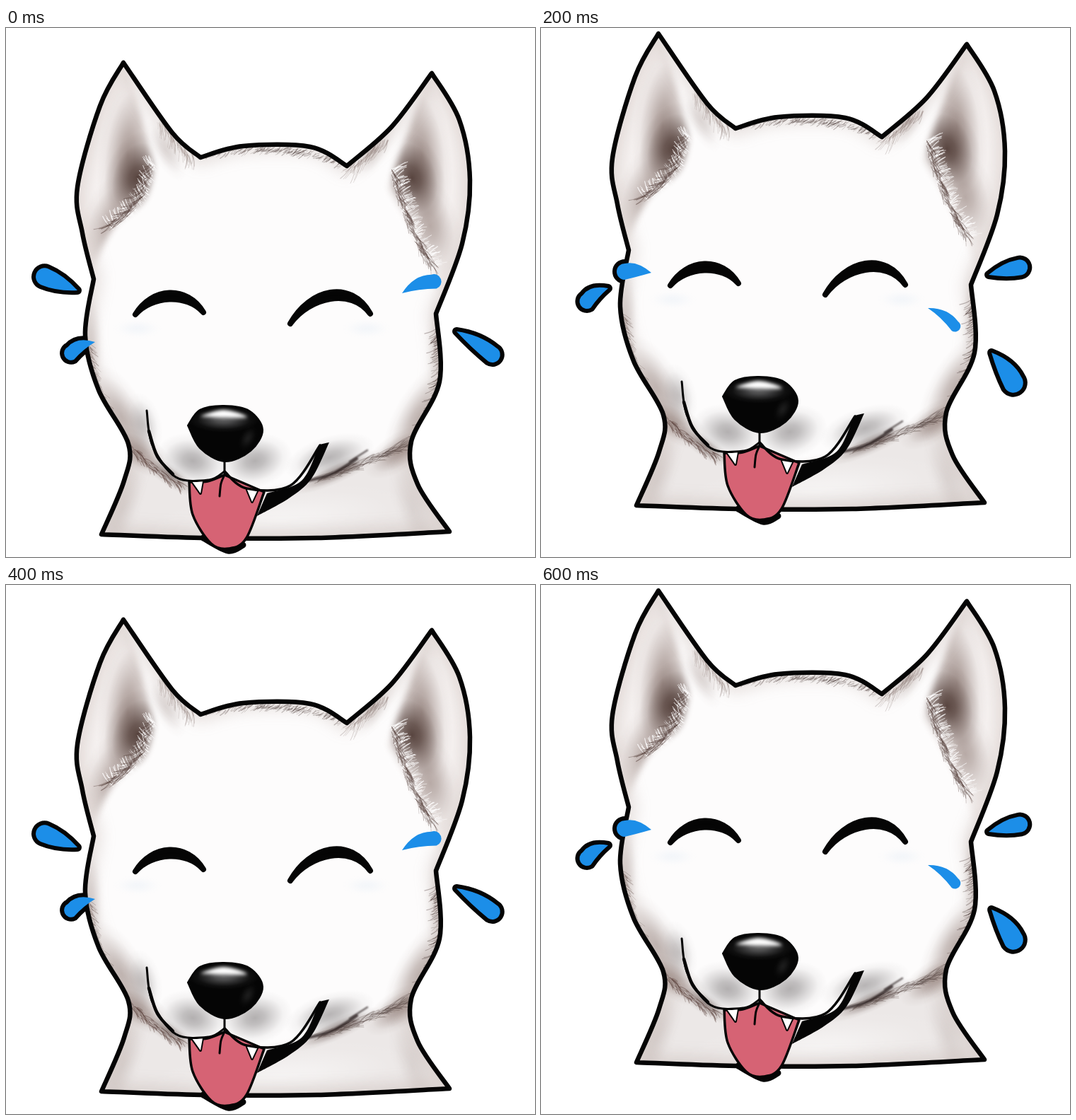
Recreate the animation shown at these times as an HTML page with a canvas. Size 748x748 px, loop 0.8 s.

```html
<!DOCTYPE html>
<html lang="en">
<head>
<meta charset="utf-8">
<title>Laughing dog</title>
<style>
html, body { margin: 0; width: 100%; height: 100%; overflow: hidden; background: #fff; }
canvas { display: block; width: 100vw; height: 100vh; }
</style>
</head>
<body>
<canvas id="stage" width="748" height="748"></canvas>
<script>
const SIZE = 748, STEP = 200, LIFT = 41;
const INK = '#050505', FACE = '#fdfcfc', BLUE = '#1c8ee8', PINK = '#d66374';
const BROWN = '98,72,64', DARK = '58,36,30', GREY = '98,93,94';
const stage = document.getElementById('stage').getContext('2d');

let seed = 7;
const rnd = () => (seed = (seed * 16807) % 2147483647) / 2147483647;
const spread = range => (rnd() - 0.5) * range;

// Smooth curve through "x,y" points; "|" marks a sharp corner.
function spline(text) {
  const path = new Path2D();
  let last = null;
  for (const part of text.split('|')) {
    const p = part.trim().split(/\s+/).map(s => s.split(',').map(Number));
    if (last) p.unshift(last); else path.moveTo(...p[0]);
    for (let i = 0; i < p.length - 1; i++) {
      const b = p[i], c = p[i + 1], a = p[i - 1] || b, d = p[i + 2] || c;
      path.bezierCurveTo(
        b[0] + (c[0] - a[0]) / 6, b[1] + (c[1] - a[1]) / 6,
        c[0] - (d[0] - b[0]) / 6, c[1] - (d[1] - b[1]) / 6, c[0], c[1]);
    }
    last = p[p.length - 1];
  }
  return path;
}

// Teardrop from its tip to its round end; bend bulges it to one side.
function drop(tipX, tipY, endX, endY, width, bend) {
  const len = Math.hypot(endX - tipX, endY - tipY), r = width / 2, mid = len * 0.42;
  const shape = new Path2D();
  shape.moveTo(0, 0);
  shape.quadraticCurveTo(mid, r * (bend - 1), len - r, -r);
  shape.arc(len - r, 0, r, -Math.PI / 2, Math.PI / 2);
  shape.quadraticCurveTo(mid, r * (bend + 1), 0, 0);
  shape.closePath();
  const path = new Path2D();
  const turn = Math.atan2(endY - tipY, endX - tipX) * 180 / Math.PI;
  path.addPath(shape, new DOMMatrix().translate(tipX, tipY).rotate(turn));
  return path;
}

// Crescent of a closed eye, arching over the chord between its corners.
function arch(x1, y1, x2, y2, rise) {
  const path = new Path2D(), inset = (x2 - x1) * 0.24;
  const high = rise * 4 / 3, low = high - 12;
  path.moveTo(x1, y1);
  path.bezierCurveTo(x1 + inset, y1 - high, x2 - inset, y2 - high, x2, y2);
  path.bezierCurveTo(x2 - inset, y2 - low, x1 + inset, y1 - low, x1, y1);
  return path;
}

const tears = [
  [
    drop(101, 371, 43, 347, 25, 0),
    drop(126, 444, 83, 464, 20, 0.8),
    drop(560, 375, 615, 355, 21, -0.8),
    drop(637, 429, 697, 468, 22, -0.3)
  ],
  [
    drop(156, 346, 107, 344, 23, 0.4),
    drop(95, 368, 56, 392, 21, 0.7),
    drop(633, 349, 688, 336, 22, -0.1),
    drop(547, 396, 592, 426, 16, -1),
    drop(637, 459, 676, 513, 28, -0.3)
  ]
];

function drawDog() {
  const cv = document.createElement('canvas');
  cv.width = cv.height = SIZE;
  const g = cv.getContext('2d');
  g.lineCap = g.lineJoin = 'round';

  const fill = (path, color, blur = 0) => {
    g.filter = `blur(${blur}px)`;
    g.fillStyle = color;
    g.fill(path);
    g.filter = 'none';
  };
  const line = (path, width, color = INK, blur = 0) => {
    g.filter = `blur(${blur}px)`;
    g.lineWidth = width;
    g.strokeStyle = color;
    g.stroke(path);
    g.filter = 'none';
  };
  const blob = (x, y, rx, ry, turn, rgb, alpha) => {
    g.save();
    g.translate(x, y);
    g.rotate(turn);
    g.scale(rx, ry);
    const grad = g.createRadialGradient(0, 0, 0, 0, 0, 1);
    [1, 0.8, 0.45, 0.12, 0].forEach((k, i) => grad.addColorStop(i / 4, `rgba(${rgb},${alpha * k})`));
    g.fillStyle = grad;
    g.fillRect(-1, -1, 2, 2);
    g.restore();
  };
  const twins = (axis, gap, y, rx, ry, turn, rgb, alpha) => {
    blob(axis - gap, y, rx, ry, turn, rgb, alpha);
    blob(axis + gap, y, rx, ry, -turn, rgb, alpha);
  };
  // Fine hairs rooted on the line from a to b, bowed sideways.
  const fur = (ax, ay, bx, by, bow, angle, len, color) => {
    const size = Math.hypot(bx - ax, by - ay);
    g.strokeStyle = color;
    for (let i = 0; i < size * 0.9; i++) {
      const t = rnd(), out = bow * 4 * t * (1 - t) + spread(8);
      const x = ax + (bx - ax) * t - (by - ay) / size * out;
      const y = ay + (by - ay) * t + (bx - ax) / size * out;
      const dir = angle + spread(0.7), l = len * (0.4 + rnd() * 0.7);
      g.lineWidth = 0.5 + rnd() * 0.8;
      g.beginPath();
      g.moveTo(x, y);
      g.quadraticCurveTo(x + Math.cos(dir) * l / 2, y + Math.sin(dir) * l / 2,
        x + Math.cos(dir + 0.25) * l, y + Math.sin(dir + 0.25) * l);
      g.stroke();
    }
  };

  const head = spline(
    '166,49 133,110 101,225 108,290 124,355 | 112,435 131,512 173,588 167,640 135,716 |' +
    '276,721 440,721 627,712 | 582,645 573,585 613,500 608,404 | 645,305 656,215 641,130 602,64 |' +
    '545,140 482,195 | 430,168 335,167 275,183 | 235,148 166,49');
  head.closePath();
  fill(head, '#f6f2f1');
  g.save();
  g.clip(head);

  // Ear hollows, then the pale face over their inner edge
  twins(380, 208, 180, 42, 120, 0.1, BROWN, 0.5);
  twins(380, 194, 212, 46, 68, 0.3, DARK, 0.8);
  twins(374, 226, 280, 42, 75, 0.25, BROWN, 0.4);
  fill(spline('166,40 | 197,140 210,195 | 196,245 150,285 112,370 | 90,480 190,600 | 300,660 435,640 | 560,590 640,480 |' +
    '612,370 575,290 540,228 | 551,190 602,55 | 375,90 166,40'), FACE, 5);
  twins(374, 148, 172, 20, 50, -0.5, BROWN, 0.2);
  fur(211, 195, 150, 285, -14, -2.5, 22, 'rgba(253,252,252,.8)');
  fur(206, 190, 145, 280, -14, 2.3, 22, 'rgba(62,38,34,.35)');
  fur(545, 200, 602, 345, 6, -0.8, 22, 'rgba(253,252,252,.8)');
  fur(546, 200, 600, 335, 6, 0.8, 20, 'rgba(62,38,34,.35)');
  fur(215, 130, 265, 186, 0, 1.1, 22, 'rgba(110,90,85,.2)');
  fur(540, 155, 490, 196, 0, 1.9, 26, 'rgba(110,90,85,.25)');

  // Neck
  fill(spline('165,585 250,648 300,668 | 435,643 580,583 | 660,740 | 110,740 | 165,585'), '#ece8e7', 4);
  blob(390, 695, 200, 50, -0.1, '255,255,255', 0.5);
  twins(372, 182, 600, 55, 26, 0.6, BROWN, 0.45);
  twins(370, 205, 680, 26, 75, 0.35, BROWN, 0.12);
  blob(232, 633, 48, 15, 0.6, DARK, 0.5);
  blob(468, 628, 70, 15, -0.42, DARK, 0.5);

  // Cheeks
  line(head, 24, 'rgba(150,125,118,.2)', 10);
  twins(374, 210, 550, 36, 85, -0.5, BROWN, 0.35);
  twins(366, 246, 450, 20, 90, 0, BROWN, 0.2);
  blob(194, 560, 26, 46, -0.25, GREY, 0.3);
  blob(458, 607, 66, 30, -0.3, GREY, 0.45);
  twins(348, 162, 425, 36, 15, 0, '205,222,240', 0.2);
  fur(285, 178, 478, 190, -14, 2.3, 11, 'rgba(60,45,42,.3)');
  fur(113, 440, 172, 590, 12, 0.6, 17, 'rgba(80,58,52,.28)');
  fur(612, 420, 572, 588, -22, 2.2, 20, 'rgba(60,42,38,.32)');
  fur(178, 594, 245, 645, 4, 0.6, 17, 'rgba(70,42,36,.35)');
  fur(435, 640, 560, 590, 4, -0.6, 26, 'rgba(80,64,60,.3)');
  g.restore();
  line(head, 6.5);

  // Muzzle
  twins(308, 44, 612, 54, 38, 0.25, GREY, 0.48);
  line(spline('428,640 462,630 496,609'), 4, 'rgba(35,25,24,.75)', 1);
  line(spline('486,613 511,597'), 2.5, 'rgba(35,25,24,.65)', 0.8);

  // Tongue, teeth and mouth
  const tongue = spline('259,642 264,688 290,729 315,736 340,721 365,656 | 309,632 | 285,641 259,642');
  line(spline('279,721 314,739 335,731'), 9);
  fill(tongue, PINK);
  line(tongue, 3.5);
  line(spline('309,632 304,644 302,662'), 3);
  for (const [x, y, lean] of [[270, 641, 5], [348, 653, 0]]) {
    const tooth = new Path2D(`M${x - 7} ${y}h15L${x + lean} ${y + 17}z`);
    line(tooth, 4);
    fill(tooth, '#fff');
  }
  fill(spline('355,690 369,658 | 418,640 443,589 | 457,586 | 432,637 400,665 355,690'), INK);
  line(spline('199,541 207,590 240,635 287,639 309,627'), 3);
  line(spline('202,570 214,606 236,631'), 4.5);
  line(spline('309,627 340,651 402,647 444,590'), 3.5);
  line(spline('309,608 309,630'), 3);

  // Nose
  const nose = spline('257,562 274,540 308,534 344,541 363,568 346,598 309,613 274,594 257,562');
  fill(nose, INK);
  g.save();
  g.clip(nose);
  blob(308, 554, 50, 18, 0, '180,180,182', 0.5);
  fill(spline('274,549 308,540 341,550 308,551 274,549'), '#fff', 2.5);
  blob(342, 580, 12, 20, 0.5, '120,120,120', 0.2);
  g.restore();
  line(nose, 2);

  for (const eye of [arch(183, 405, 279, 402, 29), arch(402, 418, 515, 404, 37)]) {
    fill(eye, INK);
    line(eye, 8);
  }
  return cv;
}

const dog = drawDog();

// Tear outlines go behind the head, so only the parts outside it keep a border.
function draw(time) {
  const pose = Math.floor(time / STEP) % 2;
  stage.fillStyle = '#fff';
  stage.fillRect(0, 0, SIZE, SIZE);
  stage.lineJoin = 'round';
  stage.lineWidth = 12;
  stage.strokeStyle = INK;
  tears[pose].forEach(t => stage.stroke(t));
  stage.drawImage(dog, 0, -LIFT * pose);
  stage.fillStyle = BLUE;
  tears[pose].forEach(t => stage.fill(t));
}

const start = performance.now();
function tick() {
  draw(performance.now() - start);
  requestAnimationFrame(tick);
}
tick();
</script>
</body>
</html>
```
